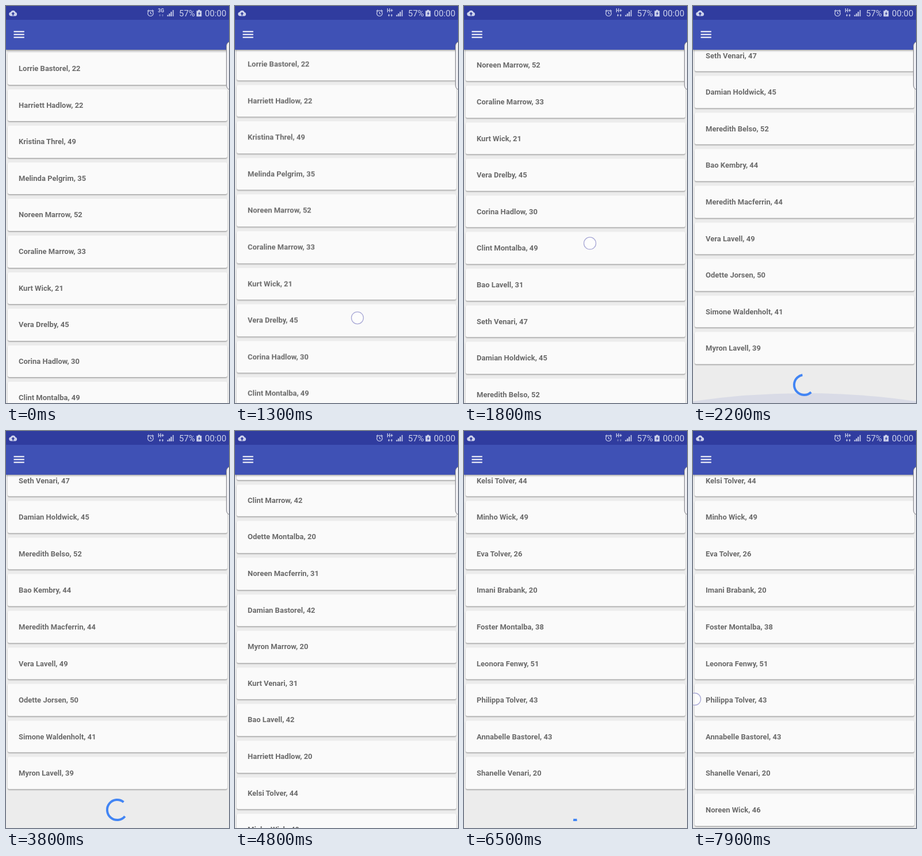
An HTML page that plays this animation: 388 px wide and 690 px high, repeating every 8000 ms.

```html
<!DOCTYPE html>
<html lang="en">
<head>
<meta charset="utf-8">
<title>Endless list</title>
<style>
html, body { margin: 0; width: 100%; height: 100%; overflow: hidden; background: #ececec; }
#stage { position: relative; width: 388px; height: 690px; overflow: hidden; background: #ececec; font-family: Roboto, "Open Sans", sans-serif; }
#list { position: absolute; left: 0; top: 0; will-change: transform; }
.card { position: absolute; left: 3px; width: 382px; height: 55.5px; box-sizing: border-box; padding-left: 19px;
  border-radius: 3px; background: #fafafa; box-shadow: 0 1.4px 1.8px rgba(0,0,0,.32);
  font-weight: 700; font-size: 13px; line-height: 56px; color: #6a6a6a; white-space: pre; }
svg { position: absolute; left: 0; top: 0; }
#bar { position: absolute; left: 0; top: 0; width: 388px; height: 76px; background: #3f51b5; box-shadow: 0 1.5px 3px rgba(0,0,0,.38); }
#status { height: 24px; background: #303c9f; }
</style>
</head>
<body>
<div id="stage">
  <div id="list"></div>
  <svg width="388" height="690" viewBox="0 0 388 690">
    <path id="glow" fill="#3f51b5"/>
    <circle id="spin" r="17.5" fill="none" stroke="#4285f4" stroke-width="4" pathLength="1"/>
  </svg>
  <div id="bar"><div id="status"></div></div>
  <svg width="388" height="690" viewBox="0 0 388 690">
    <path d="M13.5 44.5h18.3M13.500 49.500h18.300M13.500 54.500h18.300" stroke="#fff" stroke-width="2"/>
    <g fill="#cdd2ec">
      <path d="M8.500 17.500a3.600 3.600 0 0 1-.4-7.100a4.400 4.400 0 0 1 8.300 .4a3.400 3.400 0 0 1-.2 6.700z"/>
      <path d="M12.300 10.600l3 3.200h-1.900v2.600h-2.200v-2.600h-1.900z" fill="#303c9f"/>
      <path d="M280.500 15.500h2v2.500h-2zM283.500 13h2v5h-2zM286.500 10h2v8h-2z"/>
      <path d="M289.700 7h2.300v11h-2.300z" opacity=".7"/>
      <path d="M331.500 8.300h2.600v-1.600h3.600v1.600h2.600v9.900h-8.800z"/>
      <path d="M337.200 9.500l-3.400 4h2.100l-1.100 3.500l3.700-4.500h-2.100z" fill="#303c9f"/>
      <text id="net" x="269.700" y="11" font-size="8.500" font-weight="700" text-anchor="middle"></text>
      <path id="arrows" d="M267 14h1.400v2h1.100l-1.800 2.200l-1.800-2.200h1.100zM271.800 18.200h1.400v-2h1.100l-1.800-2.200l-1.800 2.200h1.100z"/>
      <g font-size="15">
        <text x="301" y="18">57%</text>
        <text x="346" y="18">00:00</text>
      </g>
    </g>
    <g fill="none" stroke="#cdd2ec" stroke-width="1.200">
      <circle cx="251.500" cy="12.700" r="4.800"/>
      <path d="M251.500 10v3l2 1M246 9.300l2.700-2.500M257 9.300l-2.700-2.500"/>
    </g>
    <rect x="383.500" y="61.500" width="18" height="84.500" rx="8" fill="#eeeef2" stroke="#7d7d84"/>
    <circle id="touch" r="10.500" fill="rgba(255,255,255,.5)" stroke="#a9a9d6" stroke-width="1.300"/>
  </svg>
</div>
<script>
const LOOP = 8000, PITCH = 63.6, TOP = 81, MID = 109, PAGE = 20;
const LOADED = [4150, 7350];      // when the second and third page arrive
const END = 722.5;                // scroll position at the end of the first page
const $ = id => document.getElementById(id);

const first = ["Lorrie Bastorel, 22", "Harriett Hadlow, 22", "Kristina Threl, 49", "Melinda Pelgrim, 35",
  "Noreen Marrow, 52", "Coraline Marrow, 33", "Kurt Wick, 21", "Vera Drelby, 45", "Corina Hadlow, 30", "Clint Montalba, 49"];
const second = ["Seth Venari, 47", "Damian Holdwick, 45", "Meredith Belso, 52", "Bao Kembry, 44",
  "Meredith Macferrin, 44", "Vera Lavell, 49", "Odette Jorsen, 50", "Simone Waldenholt, 41", "Myron Lavell, 39"];
const third = ["Kelsi Tolver, 44", "Minho Wick, 49", "Eva Tolver, 26", "Imani Brabank, 20", "Foster Montalba, 38",
  "Leonora Fenwy, 51", "Philippa Tolver, 43", "Annabelle Bastorel, 43", "Shanelle Venari, 20", "Noreen Wick, 46"];

// rows that only fly past mix given names and surnames of the others
const pool = [...first, ...second].map(s => s.split(/,? /));
const mix = i => `${pool[i * 7 % 19][0]} ${pool[(i * 5 + 3) % 19][1]}, ${20 + i * 11 % 33}`;
const rows = [...first, mix(10), ...second, ...Array.from({ length: 11 }, (_, k) => mix(20 + k)), ...third];

const cards = rows.map((text, i) => {
  const el = document.createElement("div");
  el.className = "card";
  el.style.top = TOP + i * PITCH + "px";
  el.textContent = text;
  $("list").append(el);
  return el;
});

// progress from 0 to 1 between two times
const ramp = (t, from, to) => Math.max(0, Math.min(1, (t - from) / (to - from)));
const smooth = x => x * x * (3 - 2 * x);
const mixNum = (a, b, x) => a + (b - a) * x;
const ease = x => 1 - (1 - x ** 1.4) ** 2.3;

// a slow drag, then one fling to the end of each page
function scrollAt(t) {
  const drag = 30 * ramp(t, 1100, 1600) ** 1.5;
  const fling = (END - 30) * smooth(ramp(t, 1600, 2120));
  return drag + fling + PAGE * PITCH * smooth(ramp(t, 4450, 5090));
}

// edge glow rises quickly and fades slowly
const pulse = (t, start) => smooth(ramp(t, start, start + 100)) * (1 - ramp(t, start + 180, start + 560));

const swipes = [
  { from: 880, to: 1680, a: [213, 552], b: [213, 526], fade: 60 },
  { from: 1680, to: 1860, a: [213, 526], b: [224, 320], fade: 60 },
  { from: 4430, to: 4660, a: [270, 545], b: [300, 300], fade: 80 },
  { from: 4850, to: 5060, a: [276, 540], b: [306, 294], fade: 55 },
  { from: 5330, to: 5540, a: [276, 540], b: [306, 294], fade: 80 },
  { from: 7850, to: LOOP, a: [3, 466], b: [3, 466], fade: 0 }
];

function drawTouch(t) {
  const s = swipes.find(s => t >= s.from && t < s.to + s.fade);
  $("touch").style.display = s ? "" : "none";
  if (!s) return;
  const k = ramp(t, s.from, s.to) ** 1.5;
  const x = mixNum(s.a[0], s.b[0], k), y = mixNum(s.a[1], s.b[1], k);
  $("touch").setAttribute("transform", `translate(${x} ${y})`);
  $("touch").style.opacity = 1 - ramp(t, s.to, s.to + s.fade);
}

// the arc grows at its head, then shrinks at its tail, while the ring turns
function drawSpinner(t, y) {
  const late = t >= LOADED[0];
  const on = t < LOADED[0] || (t >= 5150 && t < LOADED[1]);
  $("spin").style.display = on ? "" : "none";
  if (!on) return;
  const c = late ? (t - 6468) / 727 : (t - 1982) / 727;
  const n = Math.floor(c), p = c - n;
  const head = .75 * ease(ramp(p, 0, .5)), tail = .75 * ease(ramp(p, .5, 1));
  const angle = (late ? 69 : -26) + 242 * c + 270 * n + 360 * tail;
  const cy = MID + (late ? 2 : 1) * PAGE * PITCH - y;
  $("spin").setAttribute("transform", `translate(193.5 ${cy}) rotate(${angle})`);
  $("spin").setAttribute("stroke-dasharray", `${Math.max(.004, head - tail)} 2`);
}

function draw(t) {
  const y = scrollAt(t);
  $("list").style.transform = `translateY(${-y}px)`;
  cards.forEach((el, i) => {
    const page = Math.floor(i / PAGE);
    const ready = page === 0 || t >= LOADED[page - 1];
    el.style.display = ready && Math.abs(i * PITCH - y - 290) < 400 ? "" : "none";
    if (page && i % PAGE === 0) el.style.opacity = ramp(t, LOADED[page - 1], LOADED[page - 1] + 200);
  });
  drawSpinner(t, y);
  drawTouch(t);

  const g = pulse(t, 2080) + pulse(t, 5300);
  $("glow").setAttribute("d", `M0 690V${690 - 3 * g}Q194 ${690 - 31 * g} 388 ${690 - 3 * g}V690z`);
  $("glow").setAttribute("opacity", .11 * g);

  $("net").textContent = t < 900 ? "3G" : "H+";
  $("arrows").setAttribute("opacity", t < 900 || (t > 6250 && t < LOADED[1]) ? .4 : .95);
}

const begin = performance.now();
function frame() {
  draw((performance.now() - begin) % LOOP);
  requestAnimationFrame(frame);
}
frame();
</script>
</body>
</html>
```
